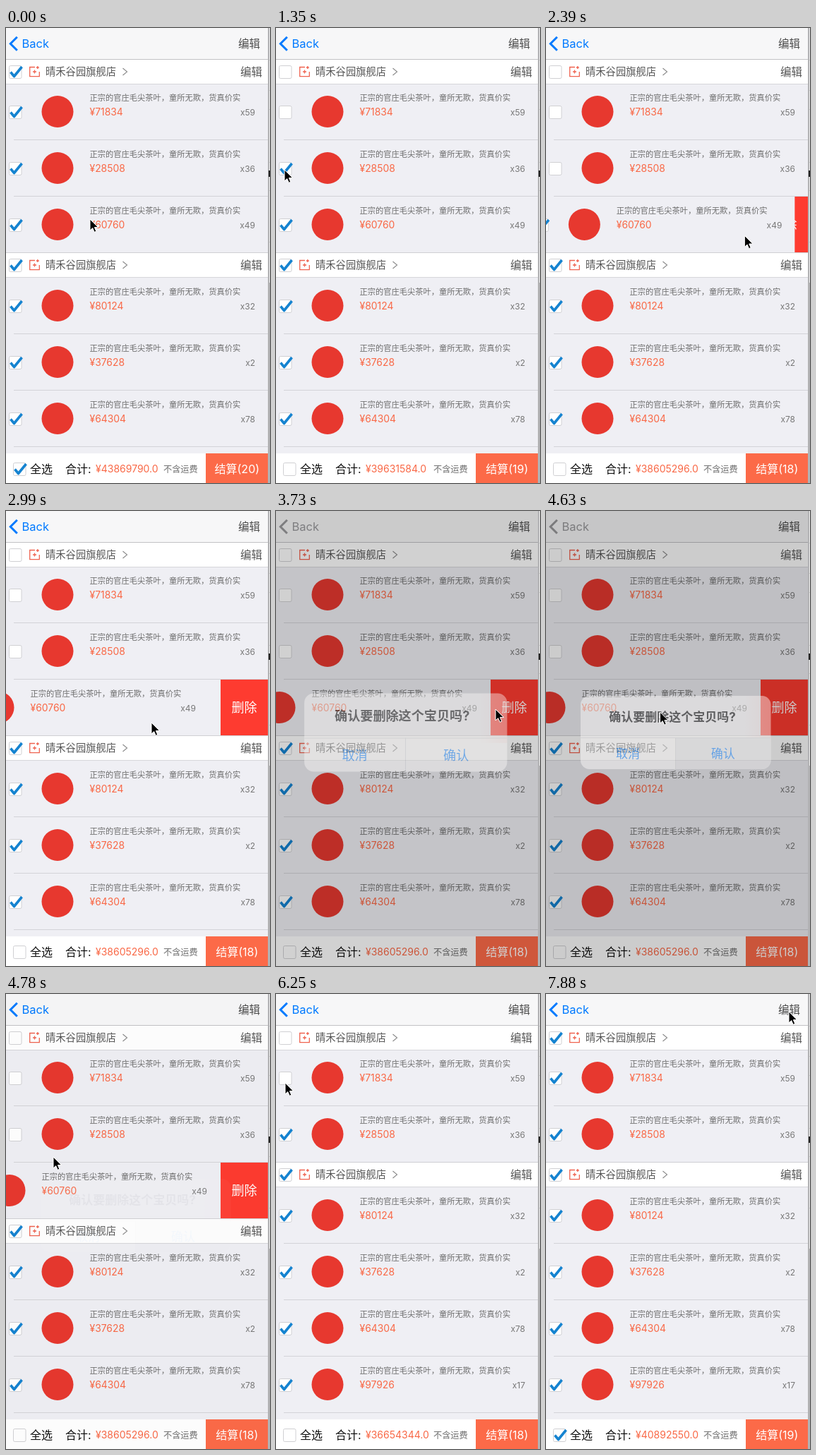
Recreate the animation shown at these times as an HTML page. Size 374 by 645 pixels, loop 8 s.

```html
<!DOCTYPE html>
<html lang="zh-CN">
<head>
<meta charset="utf-8">
<title>购物车</title>
<style>
html, body { margin: 0; width: 100%; height: 100%; overflow: hidden; background: #efeff4; }
svg { display: block; width: 374px; height: 645px; }
text { font-family: Inter, "Noto Sans CJK SC", "Noto Sans CJK", sans-serif; white-space: pre; }
</style>
</head>
<body>
<svg id="stage" viewBox="0 0 374 645"></svg>
<script>
const LOOP = 8000, LAST = 53;
const BG = '#efeff4', ORANGE = '#f96846', BLUE = '#007aff', LINE = '#d3d3d8', GREY = '#6d6d6d';
const SHOP = '晴禾谷园旗舰店';
const DESC = '正宗的官庄毛尖茶叶，童所无欺，货真价实';
const ITEMS = [
  [[71834, 59], [28508, 36], [60760, 49]],
  [[80124, 32], [37628, 2], [64304, 78], [97926, 17]]
];
const REST = 35628056, REST_COUNT = 17;

// Markup helpers
const text = (x, y, size, fill, str, extra = '') =>
  `<text x="${x}" y="${y}" font-size="${size}" fill="${fill}" ${extra}>${str}</text>`;
const rect = (x, y, w, h, fill, extra = '') =>
  `<rect x="${x}" y="${y}" width="${w}" height="${h}" fill="${fill}" ${extra}/>`;
const path = (d, stroke, width, extra = '') =>
  `<path d="${d}" fill="none" stroke="${stroke}" stroke-width="${width}" ${extra}/>`;
const MID = 'text-anchor="middle"', END = 'text-anchor="end"';

const checkbox = (id, cx, cy) => `<g transform="translate(${cx} ${cy})">
  ${rect(-8.5, -8.5, 17.5, 18, '#fff', 'rx="2" stroke="#d0d0d3"')}
  ${path('M-6.5 .5L-1.5 6.5L9.5 -7', '#1583d0', 3.6, `id="${id}" stroke-linejoin="round"`)}</g>`;

const row = (s, i, y) => {
  const [price, n] = ITEMS[s][i];
  return `<g id="row${s}${i}" transform="translate(0 ${y})">
    ${rect(0, 0, 371, 80, BG)}
    ${checkbox(`tick${s}${i}`, 13, 40)}
    <circle cx="73" cy="39.5" r="22.5" fill="#e7382f"/>
    ${text(118.5, 23.7, 11.25, GREY, DESC)}
    ${text(118.5, 45, 13.9, ORANGE, '¥' + price)}
    ${text(353, 44.5, 12, '#777', 'x' + n, END)}
    ${rect(11, 79, 360, 1, LINE)}</g>`;
};

const header = (s, y) => `<g transform="translate(0 ${y})">
  ${rect(0, 0, 371, 35, '#fff')}
  ${rect(0, 0, 371, 1, '#cfcfd3')}${rect(0, 35, 371, 1, '#d6d6da')}
  ${checkbox('head' + s, 13, 18)}
  ${path('M41 11.5H33.7V24.7H47.3V18M44.8 10V14M42.8 12H46.8M40.5 15.5V20.5M38 18H43', '#ef6350', 1.3)}
  ${text(56, 23.4, 14.3, '#555', SHOP)}
  ${path('M165.5 13L171.5 18L165.5 23', '#8a8a8a', 1.1)}
  ${text(332, 23.8, 15.5, '#555', '编辑')}</g>`;

const alertBox = `<g id="alert">
  ${rect(49, 262, 269.5, 104, '#f8f7f7', 'rx="12.5" fill-opacity=".97"')}
  <g clip-path="url(#box)">
    ${rect(280, 262, 39, 66, 'url(#glow)')}
    ${rect(183.5, 321, 136, 46, '#e5e4e6', 'id="press"')}
    ${rect(49, 321, 270, 1, '#d5d5d8')}${rect(183, 321, 1, 46, '#d5d5d8')}
  </g>
  ${text(179, 298, 17, '#000', '确认要删除这个宝贝吗?', MID + ' font-weight="700"')}
  ${text(116, 350.3, 17, BLUE, '取消', MID)}
  ${text(250.7, 350.3, 17, BLUE, '确认', MID)}</g>`;

const $ = id => document.getElementById(id);

$('stage').innerHTML = `
<defs>
  <clipPath id="box">${rect(49, 262, 269.5, 104, '#000', 'rx="12.5"')}</clipPath>
  <clipPath id="app">${rect(0, 0, 371, 645, '#000')}</clipPath>
  <linearGradient id="glow">
    <stop offset="0" stop-color="#ff5a48" stop-opacity="0"/>
    <stop offset="1" stop-color="#ff5a48" stop-opacity=".11"/>
  </linearGradient>
</defs>
<g clip-path="url(#app)">
  ${rect(0, 0, 371, 645, BG)}
  <g id="swiped">
    ${rect(0, 239, 371, 80, BG)}
    ${rect(304, 239, 67, 80, '#fe3b30')}
    ${text(337.5, 285.3, 18, '#fff', '删除', MID)}
    ${row(0, 2, 239)}
  </g>
  ${row(0, 0, 79)}${row(0, 1, 159)}
  <g id="lower">
    ${rect(0, 319, 371, 420, BG)}
    ${ITEMS[1].map((_, i) => row(1, i, 354 + 80 * i)).join('')}
    ${header(1, 318)}
  </g>
  ${header(0, 44)}
  ${rect(0, 0, 371, 44, '#f7f7f8')}${rect(0, 44, 371, 1, '#c2c2c5')}
  <g id="back">
    <path d="M15.8 12.8L6.3 22.3L15.8 31.8" fill="none" stroke="currentColor" stroke-width="3"/>
    ${text(22.5, 28, 16.5, 'currentColor', 'Back')}
  </g>
  ${text(329, 28, 15.5, '#4c4c4c', '编辑')}
  ${rect(0, 603, 371, 42, '#fff')}
  ${checkbox('all', 19, 625)}
  ${text(34, 631, 16, '#111', '全选')}
  ${text(84, 631, 16, '#111', '合计:')}
  ${text(127, 630, 14, ORANGE, '', 'id="total"')}
  ${text(223, 630, 12.2, GREY, '不含运费')}
  ${rect(283, 603, 88, 42, '#fc6a48')}
  ${text(327.3, 631, 16, '#fff', '', 'id="pay" ' + MID)}
  ${rect(0, 0, 371, 645, '#000', 'id="dim"')}
  ${alertBox}
</g>
${rect(371, 0, 3, 645, '#b2b2b4')}${rect(373, 0, 1, 361, '#ededed')}
${[45, 88, 115, 190, 230, 303].map(y => rect(373, y, 1, 1, '#cfcfcf')).join('')}
${rect(372, 202, 2, 9, '#222')}
<path id="cursor" d="M0 0V16L3.7 12.6L6.2 18.3L8.8 17.2L6.4 11.6H11.6Z" fill="#000" stroke="#fff" stroke-width="1" stroke-linejoin="round"/>`;

const tickTime = k => 150 * k - 10 * Math.round(Math.max(0, k - 14) * 0.18);
const tickAt = t => {
  let k = Math.min(LAST, Math.floor(t / 148) + 1);
  while (k > 0 && tickTime(k) > t) k--;
  return k;
};

// Keys are [tick, ...values]; ease is optional
const smooth = p => p * p * (3 - 2 * p);
const track = (keys, k, ease = p => p) => {
  const i = keys.findIndex(q => q[0] > k);
  if (i < 0) return keys[keys.length - 1].slice(1);
  if (i === 0) return keys[0].slice(1);
  const a = keys[i - 1], b = keys[i];
  const p = ease((k - a[0]) / (b[0] - a[0]));
  return a.slice(1).map((v, j) => v + (b[j + 1] - v) * p);
};

const POINTER = [
  [0, 119, 271], [4, 12, 125], [6, 12, 125], [9, 12, 201], [11, 12, 201],
  [12, 300, 293], [13, 300, 293], [20, 206, 300], [21, 232, 291], [23, 311, 281],
  [25, 311, 281], [29, 256, 339], [30, 256, 339], [32, 67, 231], [38, 13, 195],
  [39, 13, 195], [42, 13, 126], [45, 13, 126], [53, 344, 25]
];
const SETTLE = [[20, -84], [21, -80], [22, -68]];
const FADE = [[24, 0], [25, .45], [26, .92], [27, 1], [30, 1], [31, .5], [32, .03], [33, 0]];
const REMOVE = [[32, 0], [35, 1]];

const show = (id, on) => $(id).setAttribute('visibility', on ? 'inherit' : 'hidden');

function draw(t) {
  const k = tickAt(t);
  const [x, y] = track(POINTER, k, smooth);
  $('cursor').setAttribute('transform', `translate(${x} ${y})`);

  // Swipe follows the pointer, with drag past the button's width
  let slide = 0;
  if (k > 20) slide = track(SETTLE, k)[0];
  else if (k > 13) {
    const d = 300 - x;
    slide = -(Math.min(d, 68) + Math.max(0, d - 68) * 0.615);
  }
  $('row02').setAttribute('transform', `translate(${slide} 239)`);

  const gone = track(REMOVE, k, smooth)[0];
  $('swiped').setAttribute('opacity', 1 - gone);
  $('lower').setAttribute('transform', `translate(0 ${-80 * gone})`);

  const on = [k < 6 || k >= 44, k < 11 || k >= 39, k < 33];
  let sum = REST, count = REST_COUNT;
  on.forEach((v, i) => {
    if (!v) return;
    sum += ITEMS[0][i][0] * ITEMS[0][i][1];
    count++;
  });
  const full = on[0] && on[1];
  show('tick00', on[0]);
  show('tick01', on[1]);
  show('head0', full);
  show('all', full);
  $('total').textContent = '¥' + sum.toFixed(1);
  $('pay').textContent = `结算(${count})`;

  const a = track(FADE, k)[0];
  $('dim').setAttribute('opacity', 0.4 * a);
  const zoom = k < 27 ? 1.12 - 0.12 * a : 1;
  $('alert').setAttribute('opacity', a);
  $('alert').setAttribute('transform', `translate(183.5 314) scale(${zoom}) translate(-183.5 -314)`);
  show('press', k >= 30);
  $('back').setAttribute('color', k >= 25 && k < 32 ? '#99999c' : BLUE);
}

const start = performance.now();
function loop() {
  draw((performance.now() - start) % LOOP);
  requestAnimationFrame(loop);
}
loop();
</script>
</body>
</html>
```
